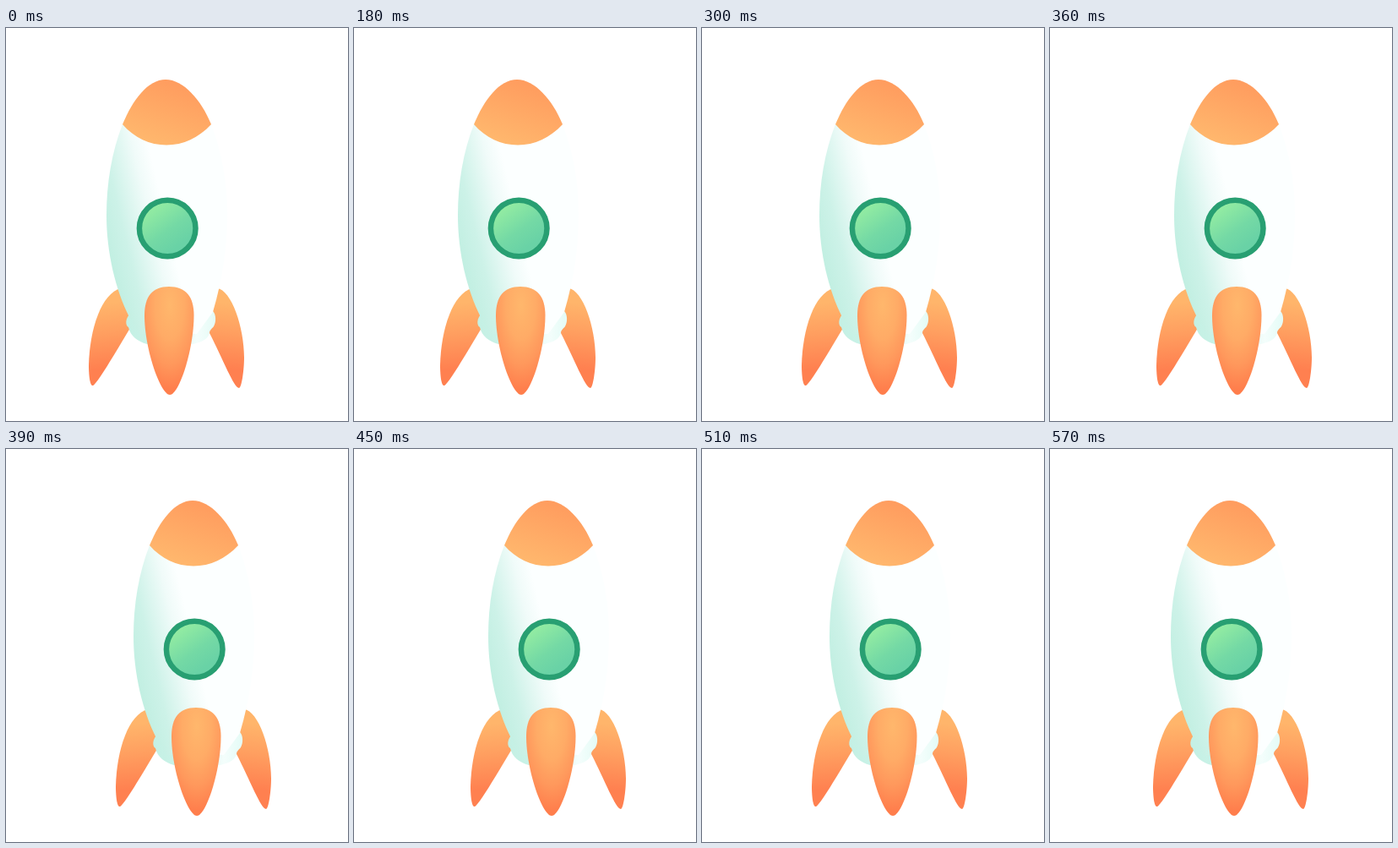
Animation of 405 by 465 pixels, one loop 0.6 s. Source, as an HTML page:

```html
<!DOCTYPE html>
<html lang="en">
<head>
<meta charset="utf-8">
<title>Rocket</title>
<style>
  html, body { margin: 0; width: 100%; height: 100%; overflow: hidden; background: #fff; }
  svg { display: block; width: 405px; height: 465px; }

  /* Rest, then sway right and partly back in 4px ticks of 30ms */
  #rocket { animation: sway 600ms infinite; }
  @keyframes sway {
    0%   { transform: translateX(0); animation-timing-function: step-end; }
    30%  { transform: translateX(4px); animation-timing-function: steps(9, end); }
    75%  { transform: translateX(40px); animation-timing-function: steps(5, end); }
    100% { transform: translateX(20px); }
  }
</style>
</head>
<body>
<svg viewBox="0 0 405 465">
  <defs>
    <linearGradient id="hull" gradientUnits="userSpaceOnUse" x1="122" y1="262" x2="194" y2="245">
      <stop offset="0" stop-color="#c2efe2"/>
      <stop offset=".3" stop-color="#cdf2e8"/>
      <stop offset=".75" stop-color="#f0fbf9"/>
      <stop offset="1" stop-color="#fcffff"/>
    </linearGradient>
    <linearGradient id="base" gradientUnits="userSpaceOnUse" x1="142" y1="0" x2="248" y2="0">
      <stop offset="0" stop-color="#c4f0e4"/>
      <stop offset=".25" stop-color="#c9f2e7"/>
      <stop offset=".8" stop-color="#f4fefc"/>
      <stop offset="1" stop-color="#e4fbf6"/>
    </linearGradient>
    <linearGradient id="nose" gradientUnits="userSpaceOnUse" x1="205" y1="68" x2="180" y2="138">
      <stop offset="0" stop-color="#ff9d5f"/>
      <stop offset="1" stop-color="#ffb76d"/>
    </linearGradient>
    <linearGradient id="finL" gradientUnits="userSpaceOnUse" x1="122" y1="325" x2="130" y2="402">
      <stop offset="0" stop-color="#ffb56b"/>
      <stop offset=".45" stop-color="#ff9f60"/>
      <stop offset="1" stop-color="#ff8050"/>
    </linearGradient>
    <linearGradient id="finR" gradientUnits="userSpaceOnUse" x1="262" y1="325" x2="254" y2="402">
      <stop offset="0" stop-color="#ffb56b"/>
      <stop offset=".45" stop-color="#ff9f60"/>
      <stop offset="1" stop-color="#ff8050"/>
    </linearGradient>
    <radialGradient id="finM" gradientUnits="userSpaceOnUse" cx="0" cy="0" r="1"
        gradientTransform="translate(194 328) scale(44 100)">
      <stop offset="0" stop-color="#ffb76c"/>
      <stop offset=".4" stop-color="#ffab66"/>
      <stop offset=".7" stop-color="#ff985c"/>
      <stop offset="1" stop-color="#ff7e4c"/>
    </radialGradient>
    <linearGradient id="glass" gradientUnits="userSpaceOnUse" x1="172" y1="213" x2="204" y2="258">
      <stop offset="0" stop-color="#93eca2"/>
      <stop offset=".6" stop-color="#74d9a5"/>
      <stop offset="1" stop-color="#69d2a6"/>
    </linearGradient>
  </defs>

  <g id="rocket">
    <path fill="url(#finL)" d="M136 308C113 314 99 356 98 399C98 409 99 424 103 423C107 422 128 387 147 355L152 335Z"/>
    <path fill="url(#finR)" d="M250 308C267 310 282 354 282 390C282 405 279 426 276 426C270 426 257 392 241 361L236 335Z"/>
    <path fill="url(#base)" d="M148 337C141 343 141 352 145 354C147 364 156 371 167 374Q194 379 222 374C233 371 239 368 241 361C241 357 245 355 246 353C249 348 249 339 245 335Z"/>
    <path fill="url(#hull)" d="M138 114C125 147 119 184 119 222C119 266 130 311 146 342L158 362H226L245 336C257 295 262 258 262 220C262 184 256 148 243 114Z"/>
    <path fill="url(#nose)" d="M138 114C150 85 168 61 189 61C210 61 231 85 243 114C228 130 210 138.500 190 138.500C170 138.500 152 130 138 114Z"/>
    <circle cx="191.200" cy="237" r="33.300" fill="url(#glass)" stroke="#289f72" stroke-width="6.500"/>
    <path fill="url(#finM)" d="M193 306C213 306 222.500 318 222.500 340C222.500 380 205 434 194 434C183 434 164 380 164 340C164 318 173 306 193 306Z"/>
  </g>
</svg>
</body>
</html>
```
